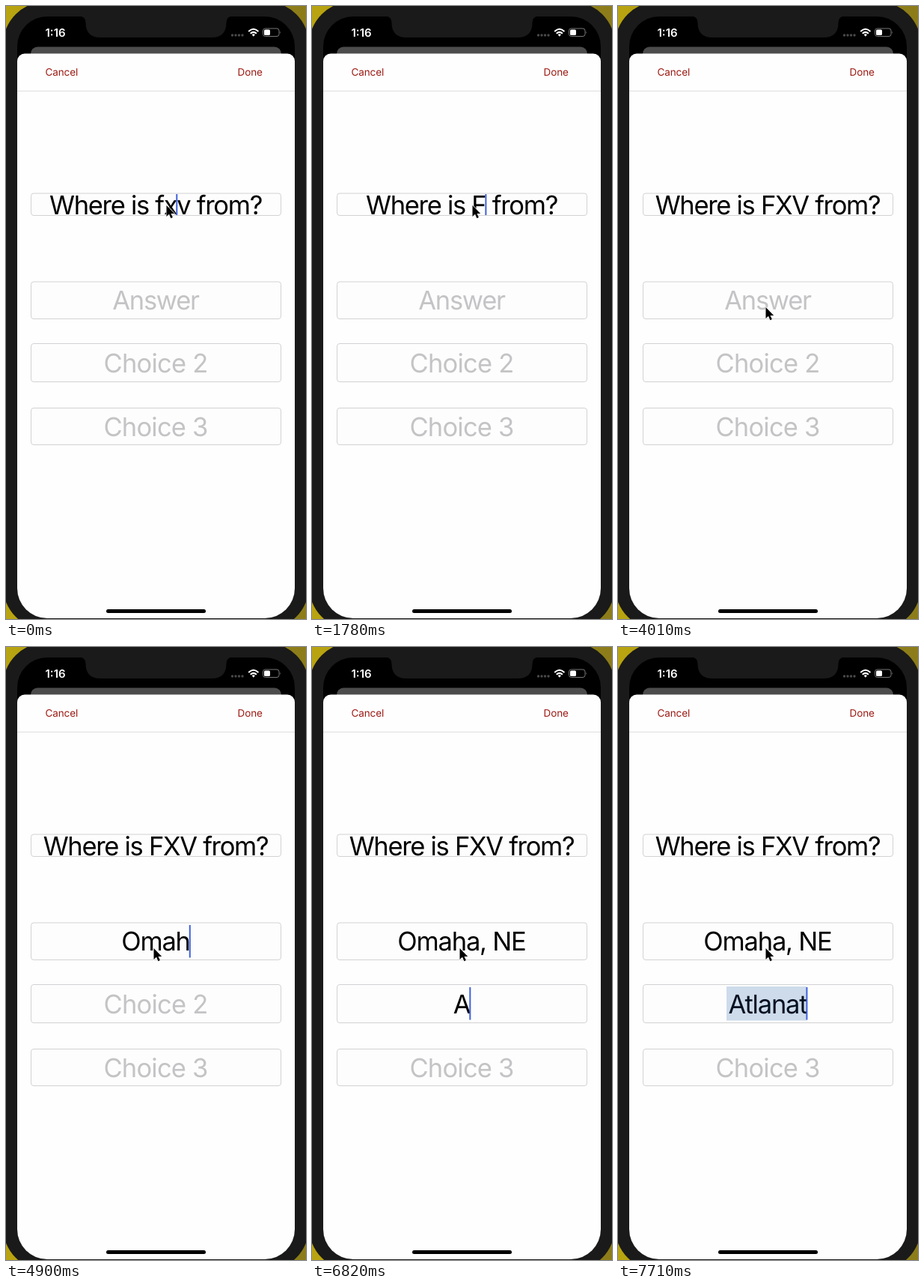
These frames come from a looping animation (401x818 px, 8000 ms). An HTML page:

```html
<!DOCTYPE html>
<html lang="en">
<head>
<meta charset="utf-8">
<title>Quiz form</title>
<style>
  html, body { margin: 0; width: 100%; height: 100%; overflow: hidden; background: #1a1a1a; }
  svg { display: block; width: 401px; height: 818px; }
  text {
    font-family: Inter, "Liberation Sans", sans-serif;
    font-optical-sizing: none;
    text-rendering: geometricPrecision;
    white-space: pre;
  }
  .field { font-size: 34.5px; text-anchor: middle; letter-spacing: -1.2px; }
  .field.empty { fill: #c4c4c6; }
  #question { letter-spacing: -1.3px; }
  #answer.empty { letter-spacing: -1.3px; }
  #choice2.empty, #choice3.empty { letter-spacing: -.8px; }
  .box { fill: #fdfdfd; stroke: #d2d2d4; }
  .bar { font-size: 13.5px; fill: #9d1b14; letter-spacing: -.1px; }
</style>
</head>
<body>
<svg viewBox="0 0 401 818">
  <defs>
    <linearGradient id="desk" x2="1" y2="0">
      <stop offset="0" stop-color="#b9a410"/>
      <stop offset="1" stop-color="#8c7c1a"/>
    </linearGradient>
    <clipPath id="screen"><rect x="15" y="14" width="371" height="803" rx="40"/></clipPath>
  </defs>

  <rect width="401" height="818" fill="url(#desk)"/>
  <rect x="-4" y="-6" width="409" height="838" rx="58" fill="#1a1a1a"/>
  <g clip-path="url(#screen)">
    <rect width="401" height="818" fill="#000"/>
    <rect x="33" y="54.5" width="335" height="30" rx="9" fill="#4c4c4c"/>
    <rect x="15" y="63.5" width="371" height="780" rx="10" fill="#fefefe"/>
  </g>
  <path d="M98 13.5H303Q294.500 14 294.500 22Q294.500 42 275 42H126Q106.500 42 106.500 22Q106.500 14 98 13.500Z" fill="#1a1a1a"/>

  <text x="52.500" y="40.500" font-size="15" font-weight="600" fill="#fff">1:16</text>
  <g fill="#4a4a4a">
    <circle cx="302.500" cy="39" r="1.700"/><circle cx="307" cy="39" r="1.700"/>
    <circle cx="311.500" cy="39" r="1.700"/><circle cx="316" cy="39" r="1.700"/>
  </g>
  <g fill="none" stroke="#fff" stroke-width="2">
    <path d="M324.200 34Q330.800 27.600 337.400 34"/>
    <path d="M326.700 36.800Q330.800 33 334.900 36.800"/>
    <path d="M328.700 38.200Q330.800 36.400 332.900 38.200L330.800 40.700Z" fill="#fff" stroke="none"/>
  </g>
  <rect x="343.500" y="30" width="21.500" height="10.500" rx="3" fill="none" stroke="#777"/>
  <rect x="345" y="31.500" width="8" height="7.500" rx="1.600" fill="#fff"/>
  <path d="M366.300 33.500q1.600 1.700 0 3.500z" fill="#777"/>

  <text class="bar" x="52.500" y="93.200">Cancel</text>
  <text class="bar" x="309.500" y="93.200">Done</text>
  <path d="M15 113.500H386" stroke="#dedede"/>

  <rect class="box" x="33.500" y="250" width="334" height="29.500" rx="3.500"/>
  <rect class="box" x="33.500" y="368" width="334" height="49.500" rx="3.500"/>
  <rect class="box" x="33.500" y="450.500" width="334" height="51" rx="3.500"/>
  <rect class="box" x="33.500" y="536.500" width="334" height="49" rx="3.500"/>

  <text class="field" id="question" x="200" y="277.500"></text>
  <text class="field" id="answer" x="200" y="405.400"></text>
  <text class="field" id="choice2" x="200" y="488.800"></text>
  <text class="field empty" id="choice3" x="200" y="573.800">Choice 3</text>

  <rect id="mark" y="453" height="45.500" fill="#0a50a0" fill-opacity=".2"/>
  <rect id="caret" width="2" fill="#3f62dc"/>
  <rect x="134" y="805" width="133" height="5" rx="2.500" fill="#000"/>
  <path id="pointer" d="M0 0V15L3.500 11.800L5.900 17.200L8.400 16.100L6 10.900H10.700Z"
        fill="#000" stroke="#fff" stroke-width="1.200" paint-order="stroke"/>
</svg>
<script>
const LOOP = 8000;
const $ = id => document.getElementById(id);
const hints = { answer: "Answer", choice2: "Choice 2" };
const carets = { question: [251, 28], answer: [371, 43.5], choice2: [454, 43.5] };
const head = "Where is ", tail = " from?";

const start = {
  question: head + "fxv" + tail, answer: "", choice2: "",
  focus: "question", at: head.length + 2, glow: 1, mark: false, pointer: [214.5, 266]
};

const name = word => ({ question: head + word + tail, at: head.length + word.length, glow: 1 });
const type = (field, text) => ({ [field]: text, focus: field, at: text.length, glow: 1 });

// Each step changes part of the state and holds until the next one.
const steps = [
  [0, start],
  [440, { at: head.length + 3 }],
  [1040, name("fx")], [1190, name("f")], [1330, name("")],
  [1780, name("F")], [1920, name("FX")], [2070, name("FXV")],
  [2670, { pointer: [216.5, 360], glow: .25 }],
  [2820, { pointer: [210, 378], glow: 0 }],
  [2970, { pointer: [201, 396] }],
  [3120, { pointer: [197.5, 402] }],
  [3270, { focus: "answer", at: 0, glow: 1 }],
  [3720, { glow: .6 }], [3860, { glow: .25 }], [4010, { glow: 0 }],
  ...[4460, 4610, 4760, 4900, 5050].map((t, i) => [t, type("answer", "Omaha".slice(0, i + 1))]),
  ...[5490, 5640, 5790, 5940].map((t, i) => [t, type("answer", "Omaha, NE".slice(0, i + 6))]),
  [6230, { focus: "choice2", at: 0, glow: 1 }],
  [6820, type("choice2", "A")], [7120, type("choice2", "At")], [7270, type("choice2", "Atl")],
  [7420, type("choice2", "Atlan")], [7560, type("choice2", "Atlana")],
  [7710, { ...type("choice2", "Atlanat"), mark: true }]
];

function setAll(el, attrs) {
  for (const key in attrs) el.setAttribute(key, attrs[key]);
}

function edgeX(el, at) {
  return at ? el.getEndPositionOfChar(at - 1).x : el.getStartPositionOfChar(0).x;
}

function draw(state) {
  for (const id in carets) {
    const el = $(id);
    el.textContent = state[id] || hints[id];
    el.classList.toggle("empty", !state[id]);
  }
  const field = $(state.focus);
  const x = edgeX(field, state.at);
  const [y, height] = carets[state.focus];
  setAll($("caret"), { x: x - 1, y, height, opacity: state.glow });
  const left = edgeX(field, 0) - 2.5;
  setAll($("mark"), { x: left, width: state.mark ? x - left : 0 });
  setAll($("pointer"), { transform: `translate(${state.pointer})` });
}

let shown = -1;
function tick() {
  const now = performance.now() % LOOP;
  const past = steps.filter(([t]) => t <= now);
  if (past.length !== shown) {
    shown = past.length;
    draw(Object.assign({}, ...past.map(step => step[1])));
  }
  requestAnimationFrame(tick);
}
tick();
</script>
</body>
</html>
```
